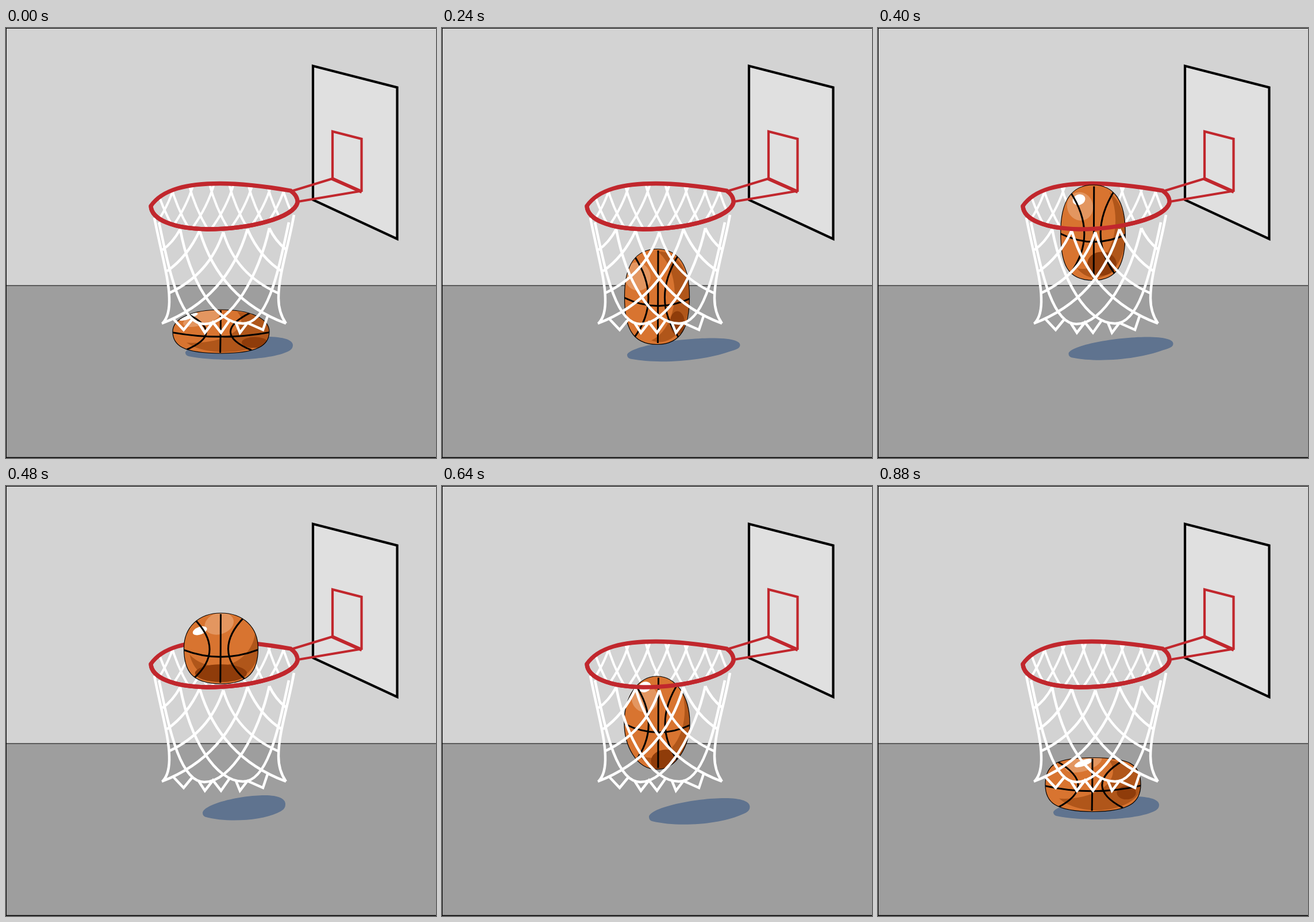
An HTML page with a canvas that plays this animation: 748 by 748 pixels, repeating every 960 ms.

```html
<!DOCTYPE html>
<html lang="en">
<head>
<meta charset="utf-8">
<title>Bouncing basketball</title>
<style>
  html, body { margin: 0; width: 100%; height: 100%; overflow: hidden; }
  canvas { display: block; }
</style>
</head>
<body>
<canvas width="748" height="748"></canvas>
<script>
const ctx = document.querySelector('canvas').getContext('2d');
const STEP = 80, STEPS = 12, BALL_X = 374;
const RED = '#c1272d', ORANGE = '#d87430';

// Per key pose, by step:
// ball: centre y, half width, half height, roundness of top and bottom, seam shift
// tone: offset of lit area, deep shade x, y, radius, glow x, y, glint x, y
// shadow: left, right, top, bottom, height of the right tip
const poses = {
  0:  { ball: [528, 84, 38, .6, .72, -.5],     tone: [-.6, -.5, .7, .5, .27, -.4, -.6, -.67, -.68],   shadow: [312, 499, 537, 576, .38] },
  2:  { ball: [505.5, 65, 61.5, .6, .68, 0],   tone: [-.4, -.12, .7, .5, .25, -.45, -.45, -.6, -1.3], shadow: [323, 496, 542, 586, .37] },
  4:  { ball: [429.5, 48, 104.5, .72, .75, 4], tone: [-.55, 0, .55, .6, .2, -.75, -.4, -.3, -.88],    shadow: [321, 541, 537, 576, .2] },
  6:  { ball: [282.5, 64.5, 61.5, .6, .72, -.5], tone: [-.1, -.52, 0, .7, .7, -.05, -.7, -.57, -.5],  shadow: [342, 486, 538, 581, .36] },
  7:  { ball: [342, 62.5, 77, .57, .57, 2],    tone: [-.2, -.14, .25, .82, .5, -.1, -.7, -.45, -.68], shadow: [343, 506, 528, 588, .33] },
  9:  { ball: [482, 51.5, 85, .57, .57, 3],    tone: [-.15, -.4, .3, .83, .42, -.65, -.35, -.3, -.86], shadow: [377, 565, 558, 590, .32] },
  11: { ball: [519.5, 83, 47, .76, .73, -1],   tone: [-.6, -.5, .7, .3, .2, -.2, -.8, -.2, -.8],      shadow: [305, 489, 540, 579, .38] }
};

function poseAt(step) {
  if (poses[step]) return poses[step];
  const before = poses[step - 1], after = poses[step + 1];
  const mean = part => before[part].map((v, i) => (v + after[part][i]) / 2);
  return { ball: mean('ball'), tone: mean('tone'), shadow: mean('shadow') };
}

const board = new Path2D('M534 66L680.5 103.5V367L534 299Z');
const square = new Path2D('M568 262V180L618.5 193V285');
const squareBase = new Path2D('M566 261.5L619 285');
const arms = new Path2D('M496 284L568 262M508 302L615 284');
const rim = new Path2D('M252 309.5C272 280.5 315 270.5 372 270.5C415 270.5 460 277 495 283Q508 292 507 304C500 330 425 350 350 350C290 349 253 333 252 309.5Z');
const rimFront = new Path2D('M507 304C500 330 425 350 350 350C290 349 253 333 252 309.5');
const backNet = new Path2D([264, 290, 322, 358, 392, 425, 458, 483].map(x =>
  `M${x + 5} 268Q${x - 7} 312 ${x - 37} 352M${x - 5} 268Q${x + 6} 312 ${x + 30} 352`).join(''));
const frontNet = new Path2D(`
  M258 330C270 390 284 440 284 470Q285 500 273 513
  M501 325C490 385 474 430 474 470Q474 495 487 514
  M266 338C282 410 300 515 345 515C392 515 440 430 458 348
  M492 338C476 410 458 515 412 514C364 514 320 440 303 350
  M337 353Q372 471 487 514M420 350Q385 470 271 514
  M378 355Q354 428 284 461M378 355Q399 428 473 461
  M337 352Q316 398 280 423M420 350Q442 400 481 424
  M303 350Q290 374 272 386M458 348Q468 370 488 386
  M292 507L309 525L323 508M335 513L346 530L360 512L374 530L388 510
  M400 513L407 530L420 513L447 525L455 501`);

function stroke(path, color, width) {
  ctx.strokeStyle = color;
  ctx.lineWidth = width;
  ctx.stroke(path);
}

function fill(path, color) {
  ctx.fillStyle = color;
  ctx.fill(path);
}

function drawScene() {
  ctx.fillStyle = '#d3d3d3';
  ctx.fillRect(0, 0, 748, 448);
  ctx.fillStyle = '#9e9e9e';
  ctx.fillRect(0, 448, 748, 300);
  ctx.fillStyle = '#000';
  ctx.fillRect(0, 447.5, 748, 1);
  ctx.fillRect(0, 0, 748, 1);
  ctx.fillRect(0, 0, 1, 748);
  ctx.fillRect(0, 746.5, 748, 1.5);
  fill(board, '#e0e0e0');
  stroke(board, '#000', 4.2);
}

function drawShadow([left, right, top, bottom, tip]) {
  ctx.save();
  ctx.translate(left, top);
  ctx.scale(right - left, bottom - top);
  fill(new Path2D(`M0 .7C.02 .35 .45 0 .75 0C.92 0 1 ${tip * .4} 1 ${tip}
    C1 ${tip * 1.5} .97 ${tip * 1.7} .9 ${tip * 2}
    C.7 ${.5 + tip * 1.45} .3 1.12 .03 .87Q0 .83 0 .7Z`), '#5f738f');
  ctx.restore();
}

function drawBall([y, a, b, top, bottom, shift], [litX, litY, deepX, deepY, deepR, glowX, glowY, glintX, glintY]) {
  const outline = new Path2D();
  const quarter = (x1, y1, x2, y2, k1, k2 = k1) => outline.bezierCurveTo(
    a * (x1 + k1 * x2), b * (y1 + k1 * y2), a * (x2 + k2 * x1), b * (y2 + k2 * y1), a * x2, b * y2);
  outline.moveTo(-a, 0);
  quarter(-1, 0, 0, -1, top);
  quarter(0, -1, 1, 0, top);
  quarter(1, 0, 0, 1, bottom - .1, bottom + .05);
  quarter(0, 1, -1, 0, bottom + .08, bottom - .1);

  const oval = (x, y, rx, ry, color, turn = 0) => {
    ctx.beginPath();
    ctx.ellipse(a * x, b * y, a * rx, b * ry, turn, 0, 7);
    ctx.fillStyle = color;
    ctx.fill();
  };
  const seam = (x1, y1, cx, cy, x2, y2) => {
    ctx.moveTo(a * x1 + shift, b * y1);
    ctx.quadraticCurveTo(a * cx + shift, b * cy, a * x2 + shift, b * y2);
  };

  ctx.save();
  ctx.translate(BALL_X, y);
  ctx.save();
  ctx.clip(outline);
  fill(outline, ORANGE);
  oval(.08, 0, .94, .95, '#b0561a');
  oval(litX, litY, 1.02, 1.02, ORANGE);
  oval(deepX, deepY, deepR, .25, '#8f3c0a');
  oval(glowX, glowY, .4, .3, '#e39660', -.3);
  oval(glintX, glintY, .2, .11, '#fff', -.35);
  const bow = 2 * Math.min(.24, 45 / b - .35);
  ctx.beginPath();
  seam(0, -.97, 0, 0, -.01, .97);
  seam(-1.1, 0, 0, bow, 1.1, 0);
  seam(-.74, -.86, .14, .05, -.74, .86);
  seam(.63, -.88, -.23, .05, .64, .86);
  ctx.strokeStyle = '#000';
  ctx.lineWidth = 3;
  ctx.stroke();
  ctx.restore();
  stroke(outline, '#000', 1.2);
  ctx.restore();
}

function draw(step) {
  const { ball, tone, shadow } = poseAt(step);
  drawScene();
  drawShadow(shadow);
  stroke(square, RED, 4.2);
  stroke(squareBase, RED, 6);
  stroke(arms, RED, 4.2);
  ctx.save();
  ctx.clip(rim);
  stroke(backNet, '#fff', 4);
  ctx.restore();
  stroke(rim, RED, 7.3);
  drawBall(ball, tone);
  stroke(frontNet, '#fff', 4.5);
  stroke(rimFront, RED, 7.3);
}

function tick(now) {
  draw(Math.floor(now / STEP) % STEPS);
  requestAnimationFrame(tick);
}
tick(0);
</script>
</body>
</html>
```
